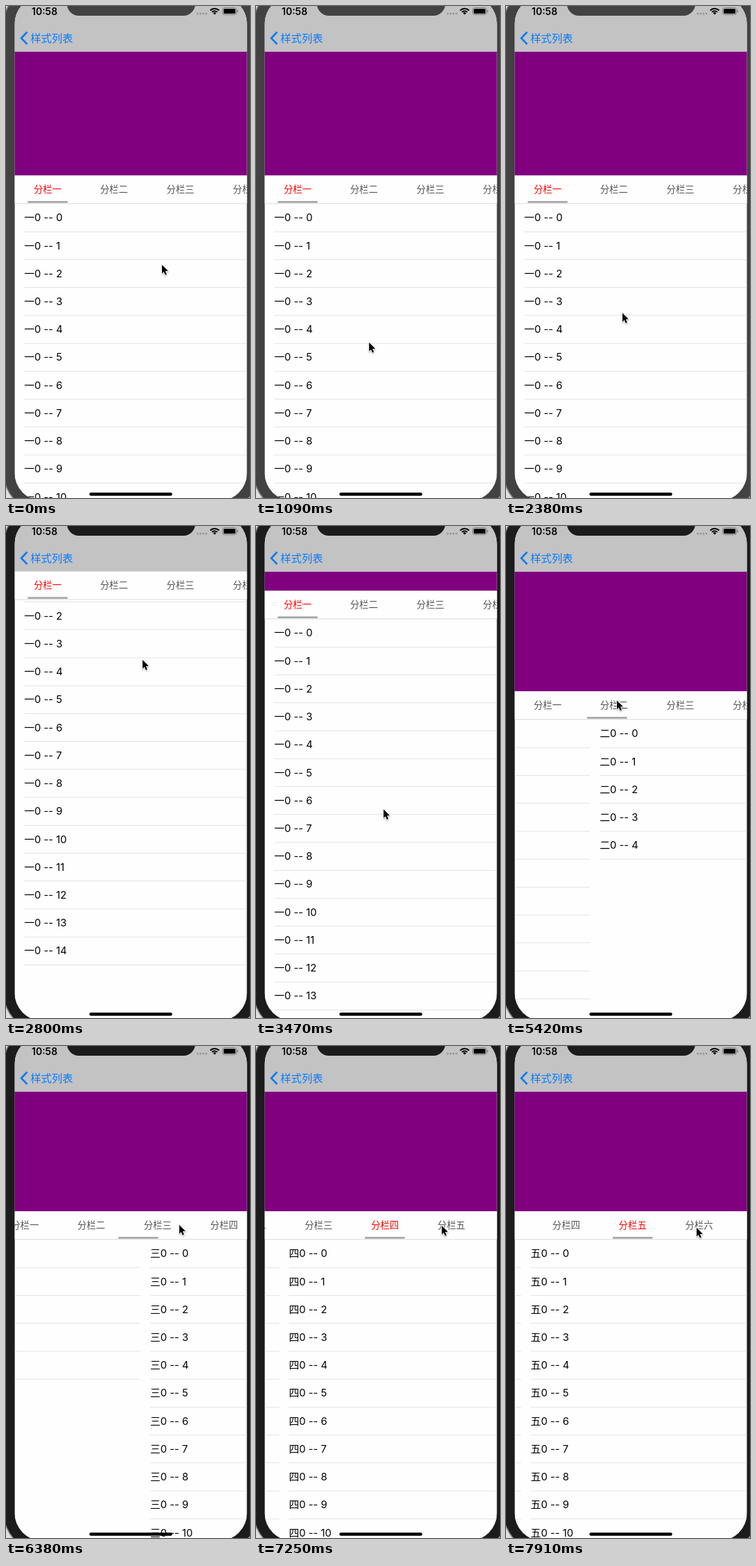
These frames come from a looping animation (352x709 px, 8000 ms). An HTML page with a canvas:

```html
<!DOCTYPE html>
<html lang="zh-CN">
<head>
<meta charset="utf-8">
<style>
html, body { margin: 0; width: 352px; height: 709px; overflow: hidden; }
canvas { display: block; }
</style>
</head>
<body>
<canvas id="stage" width="352" height="709"></canvas>
<script>
const ctx = document.getElementById('stage').getContext('2d');
const LOOP = 8000, FOCUS_TIME = 2420;
const LEFT = 12.4, WIDTH = 335.3, ROW = 40.22, TAB = 95.8;
const NAV_END = 65.6, HEADER_END = 244.3, BAR = 40;
const FONT = 'Inter, "Noto Sans CJK SC", "Noto Sans CJK", "Noto Sans", sans-serif';
const NUMERALS = [...'一二三四五六七八'];

// Moves are [start, end, ...values reached]
const SCROLL_MOVES = [[2380, 2800, 256], [2800, 3160, 208], [3200, 3920, 28.5], [3920, 4270, 6]];
const POINTER_MOVES = [
  [530, 1140, 162, 487], [2330, 2380, 168, 442.5], [2380, 2800, 197, 193],
  [2800, 3920, 177, 526], [4010, 4270, 186, 286], [4400, 4920, 160, 251.5],
  [5500, 6090, 250, 258], [6670, 7000, 268, 259], [7280, 7510, 275, 262]
];
const TURN_MOVES = [5223, 6230, 6980, 7623].map((start, i) => [start, start + 320, i + 1]);

const mix = (a, b, p) => a + (b - a) * p;

function glide(origin, moves, t) {
  return moves.reduce((at, [start, end, ...to]) => {
    const p = Math.max(0, Math.min(1, (t - start) / (end - start)));
    return at.map((v, i) => mix(v, to[i], p * p * (3 - 2 * p)));
  }, origin);
}

function rect(x, y, w, h, color) {
  ctx.fillStyle = color;
  ctx.fillRect(x, y, w, h);
}

function round(x, y, w, h, r, color) {
  ctx.fillStyle = color;
  ctx.beginPath();
  ctx.roundRect(x, y, w, h, r);
  ctx.fill();
}

function text(str, x, y, size, color, align = 'left', weight = 400) {
  ctx.font = `${weight} ${size}px ${FONT}`;
  ctx.textAlign = align;
  ctx.fillStyle = color;
  ctx.fillText(str, x, y);
}

function drawList(index, x, top) {
  const count = index === 1 ? 5 : 15;
  for (let i = 0; i < count; i++) {
    const y = top + i * ROW;
    text(`${NUMERALS[index]}0 -- ${i}`, x + 13.8, y + ROW / 2 + 5.4, 14.8, '#000');
    rect(x + 13.8, y + ROW, WIDTH - 13.8, 0.5, '#c8c7cc');
  }
}

function drawTabs(y, page) {
  const index = Math.floor(page), p = page - index;
  const centred = i => Math.max(0, 60 + TAB * i - 180);
  const shift = mix(centred(index), centred(index + 1), p);
  const active = p < 0.001 ? index : p > 0.85 ? index + 1 : -1;
  rect(LEFT, y, WIDTH, BAR, '#fefefe');
  NUMERALS.forEach((n, i) => {
    text('分栏' + n, 60 + TAB * i - shift, y + 24.5, 13.4, i === active ? '#f00' : '#555', 'center');
  });
  const lead = index + 1 - (1 - p) ** 2;
  round(31.2 + TAB * lead - shift, y + 36.7, 57.8, 2.8, 1, '#a8a8a8');
  rect(LEFT, y + BAR, WIDTH, 0.9, '#d8d8d8');
}

function wifiArc(radius) {
  ctx.arc(301, 12.5, radius, -Math.PI * 0.76, -Math.PI * 0.24);
}

function drawNav() {
  rect(LEFT, 0, WIDTH, NAV_END, '#c3c3c3');
  text('10:58', 37, 12.5, 14, '#000', 'left', 600);
  for (let i = 0; i < 4; i++) round(275 + i * 4.2, 9.5, 3, 3, 1.5, '#999');

  ctx.strokeStyle = '#000';
  ctx.lineWidth = 2;
  for (const radius of [5.3, 8.8]) {
    ctx.beginPath();
    wifiArc(radius);
    ctx.stroke();
  }
  ctx.beginPath();
  ctx.moveTo(301, 12.5);
  wifiArc(3.2);
  ctx.fillStyle = '#000';
  ctx.fill();

  ctx.strokeStyle = '#777';
  ctx.lineWidth = 1;
  ctx.beginPath();
  ctx.roundRect(312.5, 2.5, 20, 10, 3);
  ctx.stroke();
  round(314, 4, 17, 7, 1.5, '#000');
  round(333.5, 5.7, 1.3, 3.6, 0.6, '#777');

  ctx.strokeStyle = '#0a7aff';
  ctx.lineWidth = 2.6;
  ctx.stroke(new Path2D('M30.5 37.5 L22 46.3 L30.5 55'));
  text('样式列表', 35.3, 51.6, 15.3, '#0a7aff');
}

function drawPointer([x, y]) {
  const arrow = new Path2D('M0 0 V14.5 L3.2 11.6 L5.5 17 L8 16 L5.7 10.6 L10.3 10.3 Z');
  ctx.save();
  ctx.translate(x, y);
  ctx.scale(0.86, 0.86);
  ctx.shadowColor = 'rgba(0,0,0,.35)';
  ctx.shadowBlur = 2;
  ctx.shadowOffsetY = 1;
  ctx.strokeStyle = '#fff';
  ctx.lineWidth = 1.8;
  ctx.stroke(arrow);
  ctx.shadowColor = 'transparent';
  ctx.fillStyle = '#000';
  ctx.fill(arrow);
  ctx.restore();
}

function draw(t) {
  const [scroll] = glide([0], SCROLL_MOVES, t);
  const [page] = glide([0], TURN_MOVES, t);
  const shell = t < FOCUS_TIME ? '#424242' : '#1c1c1c';
  const barTop = Math.max(NAV_END, HEADER_END - scroll);

  rect(0, 0, 352, 709, '#dedede');
  round(-4, -30, 368, 759, 56, '#858585');
  round(-2.5, -28.5, 365, 756, 54.5, shell);

  ctx.save();
  ctx.beginPath();
  ctx.roundRect(LEFT, -14, WIDTH, 727, 40);
  ctx.clip();
  rect(LEFT, 0, WIDTH, 709, '#fefefe');
  for (let i = Math.floor(page); i <= Math.ceil(page); i++) {
    drawList(i, LEFT + (i - page) * WIDTH, HEADER_END + BAR + 0.5 - scroll);
  }
  rect(LEFT, NAV_END, WIDTH, barTop - NAV_END, '#800080');
  drawTabs(barTop, page);
  drawNav();
  round(88, -20, 185, 34, 18, shell);
  round(120.3, 701.3, 119.5, 4.4, 2.2, '#000');
  ctx.restore();

  drawPointer(glide([225, 373], POINTER_MOVES, t));
}

const begin = performance.now();
function tick() {
  draw((performance.now() - begin) % LOOP);
  requestAnimationFrame(tick);
}
tick();
</script>
</body>
</html>
```
